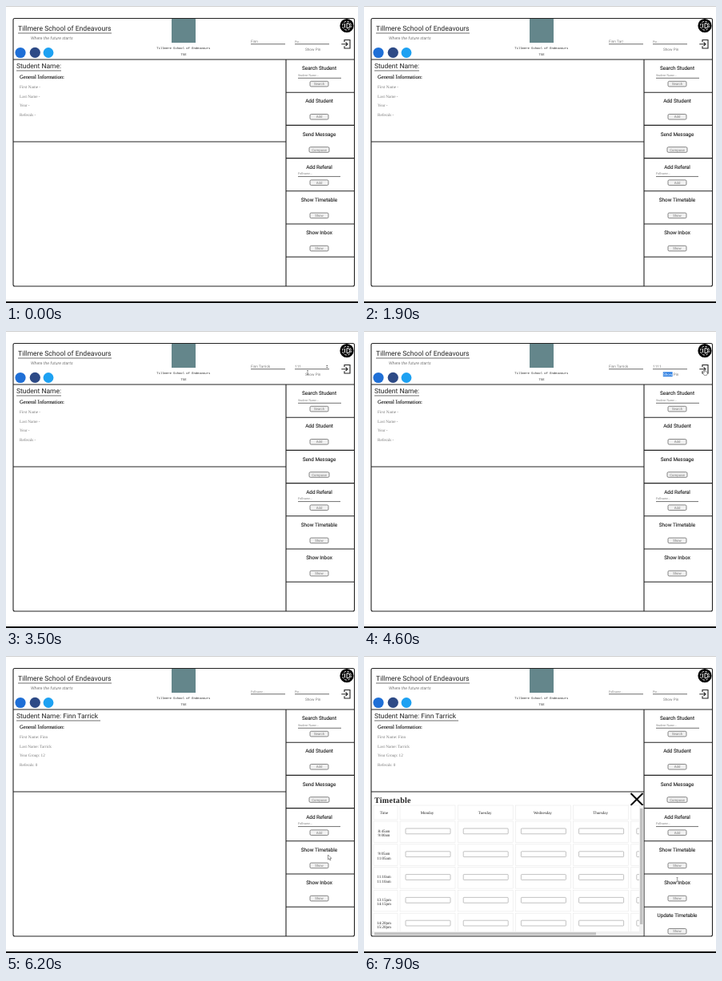
These frames come from a looping animation (440 by 372 pixels, 8000 ms). An HTML page:

```html
<!DOCTYPE html>
<html lang="en">
<head>
<meta charset="utf-8">
<title>Student portal</title>
<style>
  html, body { margin: 0; height: 100%; overflow: hidden; background: #fff; }
  svg { display: block; width: 440px; height: 372px; text-rendering: geometricPrecision; }
  text { font-family: Roboto, sans-serif; fill: #222; white-space: pre; }
  .serif { font-family: "Liberation Serif", serif; }
  .mono { font-family: "Liberation Mono", monospace; }
  .grey { fill: #777; }
  .line { fill: none; stroke: #222; stroke-width: 1.1; }
  .thin { fill: none; stroke: #333; stroke-width: .7; }
  .cell { fill: none; stroke: #e8e8e8; stroke-width: .6; }
  .field { fill: #fff; stroke: #999; stroke-width: .6; }
  .button { fill: #f1f1f1; stroke: #555; stroke-width: .7; }
  .cursor { fill: #fff; stroke: #555; stroke-width: .6; }
</style>
</head>
<body>
<svg id="stage" viewBox="0 0 440 372"></svg>
<script>
const SCHOOL = 'Tillmere School of Endeavours';
const FIRST = 'Finn', LAST = 'Tarrick';
const LOOP = 8000, LOGIN = 5400, OPEN = 7800;
const stage = document.getElementById('stage');

const text = (x, y, size, str, cls = '', extra = '') =>
  `<text x="${x}" y="${y}" font-size="${size}" class="${cls}" ${extra}>${str}</text>`;
const centred = (x, y, size, str, cls, extra = '') =>
  text(x, y, size, str, cls, 'text-anchor="middle" ' + extra);
const path = (d, cls = 'line', extra = '') => `<path d="${d}" class="${cls}" ${extra}/>`;
const rect = (x, y, w, h, cls, extra = '') =>
  `<rect x="${x}" y="${y}" width="${w}" height="${h}" class="${cls}" ${extra}/>`;
const dot = (x, y, r, fill) => `<circle cx="${x}" cy="${y}" r="${r}" fill="${fill}"/>`;
const group = (id, content) => `<g id="${id}">${content}</g>`;

function panel(row, title, label) {
  const y = 67 + row * 41.2, w = label === 'Compose' ? 25 : 23;
  return centred(391.5, y + 13.2, 6.35, title, '', 'stroke="#222" stroke-width=".12"') +
    rect(391.5 - w / 2, y + 27.3, w, 6.6, 'button', 'rx="1.5"') +
    centred(391.5, y + 32.2, 4.3, label, 'grey');
}

function header() {
  return text(15, 31, 8.65, SCHOOL) + path('M15 34H132', 'thin') +
    text(31, 42, 5.3, 'Where the future starts', 'grey', 'font-style="italic"') +
    dot(18, 58.5, 6.6, '#1f6fd6') + dot(36.3, 58.3, 6.6, '#2d4a86') + dot(53, 58.5, 6.4, '#1da1f2') +
    rect(207, 16, 30, 30, '', 'fill="#64868b"') +
    centred(221.8, 54, 3.85, SCHOOL, 'mono') + centred(222, 62, 3.85, 'TSE', 'mono') +
    path('M306 47.7H349M361 47.7H404', 'thin') +
    dot(426, 24.7, 8.6, '#000') +
    '<circle cx="426" cy="24.7" r="5.4" fill="none" stroke="#fff" stroke-dasharray="2.6 1.6"/>' +
    path('M426 21.7h1a3 3 0 0 1 0 6h-1zM423.4 22v5.4', '', 'fill="none" stroke="#fff" stroke-width="1"') +
    path('M423 45.2V42.5H430V53H423V50.3M419.3 47.7H427M424.6 45.3L427 47.7L424.6 50.1');
}

function sidebar() {
  let lines = '';
  for (let row = 1; row < 7; row++) lines += `M350 ${67 + row * 41.2}H435.5`;
  return path('M350 67V351' + lines) +
    panel(0, 'Search Student', 'Search') + panel(1, 'Add Student', 'Add') +
    panel(2, 'Send Message', 'Compose') + panel(3, 'Add Referal', 'Add') +
    panel(4, 'Show Timetable', 'Show') + panel(5, 'Show Inbox', 'Show') +
    text(365, 88.2, 4, 'Student Name...', 'serif grey') + path('M365 90.3H419', 'thin') +
    text(365, 211.3, 4, 'Fullname...', 'serif grey') + path('M365 213.6H418', 'thin');
}

function timetable() {
  const days = ['Monday', 'Tuesday', 'Wednesday', 'Thursday', ''];
  const times = ['8:45am 9:00am', '9:05am 11:05am', '11:10am 11:10am', '13:15pm 14:15pm', '14:20pm 15:20pm'];
  let grid = rect(12, 187, 30, 18, 'cell') + centred(25, 197.6, 5, 'Time', 'serif');
  days.forEach((day, col) => {
    const x = 45 + col * 72.2;
    grid += rect(x, 187, 69, 18, 'cell') + centred(x + 34, 197.6, 5, day, 'serif');
  });
  times.forEach((time, row) => {
    const y = 207 + row * 28.8, [from, to] = time.split(' ');
    grid += rect(12, y, 30, 26.5, 'cell') +
      centred(25, y + 13.5, 5, from, 'serif') + centred(25, y + 19, 5, to, 'serif');
    days.forEach((_, col) => {
      const x = 45 + col * 72.2;
      grid += rect(x, y, 69, 26.5, 'cell') + rect(x + 7, y + 9, 56, 6.8, 'field', 'rx=".8"');
    });
  });
  return text(13, 184, 10, 'Timetable', 'serif', 'font-weight="bold" letter-spacing=".3"') +
    path('M333.5 172L348.5 187M348.5 172L333.5 187', 'line', 'style="stroke:#000;stroke-width:2"') +
    `<clipPath id="view"><rect x="10" y="186" width="334" height="159"/></clipPath>` +
    `<g clip-path="url(#view)">${grid}</g>` +
    rect(344, 187, 5.4, 158, '', 'fill="#f1f1f1"') + rect(345, 191, 3.4, 145, '', 'fill="#c1c1c1"') +
    rect(10, 345, 339.4, 5.4, '', 'fill="#f1f1f1"') + rect(13, 346.2, 277, 3.2, '', 'fill="#c1c1c1"') +
    panel(6, 'Update Timetable', 'Show');
}

const details = rows => rows.map((row, i) => text(17, 103 + i * 11.7, 5.15, row, 'serif grey')).join('');

stage.innerHTML =
  rect(0, 0, 440, .7, '', 'fill="#bbb"') + rect(0, 370, 440, 2, '', 'fill="#111"') +
  header() + sidebar() +
  text(17, 91, 6.6, 'General Information:', 'serif', 'stroke="#222" stroke-width=".15"') +
  group('before', text(13, 78.4, 8.5, 'Student Name:') + path('M13 81H69', 'thin') +
    details(['First Name -', 'Last Name -', 'Year -', 'Referals -'])) +
  group('after', text(13, 78.4, 8.5, `Student Name: ${FIRST} ${LAST}`) + path('M13 81H118', 'thin') +
    details(['First Name: ' + FIRST, 'Last Name: ' + LAST, 'Year Group: 12', 'Referals: 0'])) +
  group('table', timetable()) +
  path('M11 15.5H433.5Q435.5 15.5 435.5 17.5V349Q435.5 351 433.5 351H11Q9 351 9 349V17.5Q9 15.5 11 15.5M9 67H435.5M9 170H350') +
  '<text id="name" x="306" y="46.3" class="grey"/><text id="pin" x="361" y="46.3" class="grey"/>' +
  group('spinner', path('M400 44L401.3 42.4L402.6 44ZM400 45L401.3 46.6L402.6 45Z', '', 'fill="#666"')) +
  text(374, 55.8, 4.7, 'Show Pin', 'grey') +
  group('selection', rect(373.8, 51.3, 11.8, 5.8, '', 'fill="#2a7de1"') +
    text(374, 55.8, 4.7, 'Show', '', 'style="fill:#fff"')) +
  group('arrow', path('M0 0V6L1.5 4.7L2.5 7L3.4 6.6L2.5 4.4H4.4Z', 'cursor')) +
  group('hand', path('M-.7 4V.5Q0-.5 .7 .5V2.6L3.2 3.3V5.6L2.4 7.4H-.8L-2.6 4.6Q-2-4 -.7 4Z'.replace('-2-4 ', '-2 3.4 '), 'cursor')) +
  group('beam', path('M-1 -2.5H1M0 -2.5V2.5M-1 2.5H1', 'thin', 'style="stroke:#777"'));

const part = Object.fromEntries([...stage.querySelectorAll('[id]')].map(el => [el.id, el]));
const show = (id, on) => part[id].setAttribute('visibility', on ? 'visible' : 'hidden');
const typed = (t, str, times) => str.slice(0, times.filter(at => t >= at).length);

// Pointer stops: time, x, y
const route = [
  [2500, 439, 60], [3000, 425, 60], [3400, 377, 52], [3900, 377, 52], [4400, 426, 48],
  [5300, 426, 48], [6200, 402.5, 249], [6600, 400, 264], [7100, 404, 256],
  [7500, 391.5, 262.5], [7700, 391.5, 262.5], [7900, 391.5, 280]
];

function movePointer(t) {
  const next = Math.max(1, route.findIndex(stop => stop[0] >= t));
  const [t0, x0, y0] = route[next - 1], [t1, x1, y1] = route[next];
  const k = (t - t0) / (t1 - t0), ease = k * k * (3 - 2 * k);
  const x = x0 + (x1 - x0) * ease, y = y0 + (y1 - y0) * ease;
  const overButton = Math.abs(x - 391.5) < 12 && Math.abs(y - 262) < 4;
  const overLogin = x > 419 && y > 42 && y < 54;
  const overText = (x > 374 && x < 393 && y > 49 && y < 57) || (y > 278 && y < 287);
  const shape = overButton || overLogin ? 'hand' : overText ? 'beam' : 'arrow';
  for (const id of ['arrow', 'hand', 'beam']) {
    show(id, t >= route[0][0] && id === shape);
    part[id].setAttribute('transform', `translate(${x} ${y})`);
  }
}

function input(id, value, hint) {
  part[id].textContent = value || hint;
  part[id].setAttribute('font-size', value ? 4.7 : 4);
  part[id].classList.toggle('serif', !value);
}

function draw(now) {
  const t = Math.floor(now % LOOP / 100) * 100;
  const done = t >= LOGIN;
  let name = FIRST + typed(t, ' ' + LAST, [1500, 1700, 1800, 1900, 2100, 2200, 2400, 2500]);
  if (t >= 1500 && t < 2000) name += '|';
  input('name', done ? '' : name, 'Fullname...');
  input('pin', done ? '' : typed(t, '1111', [3100, 3300, 3500, 3800]), 'Pin...');
  show('before', !done);
  show('after', done);
  show('table', t >= OPEN);
  show('spinner', t >= 2900 && t < 3800);
  show('selection', t >= 4000 && t < 5000);
  movePointer(t);
  requestAnimationFrame(draw);
}
requestAnimationFrame(draw);
</script>
</body>
</html>
```
